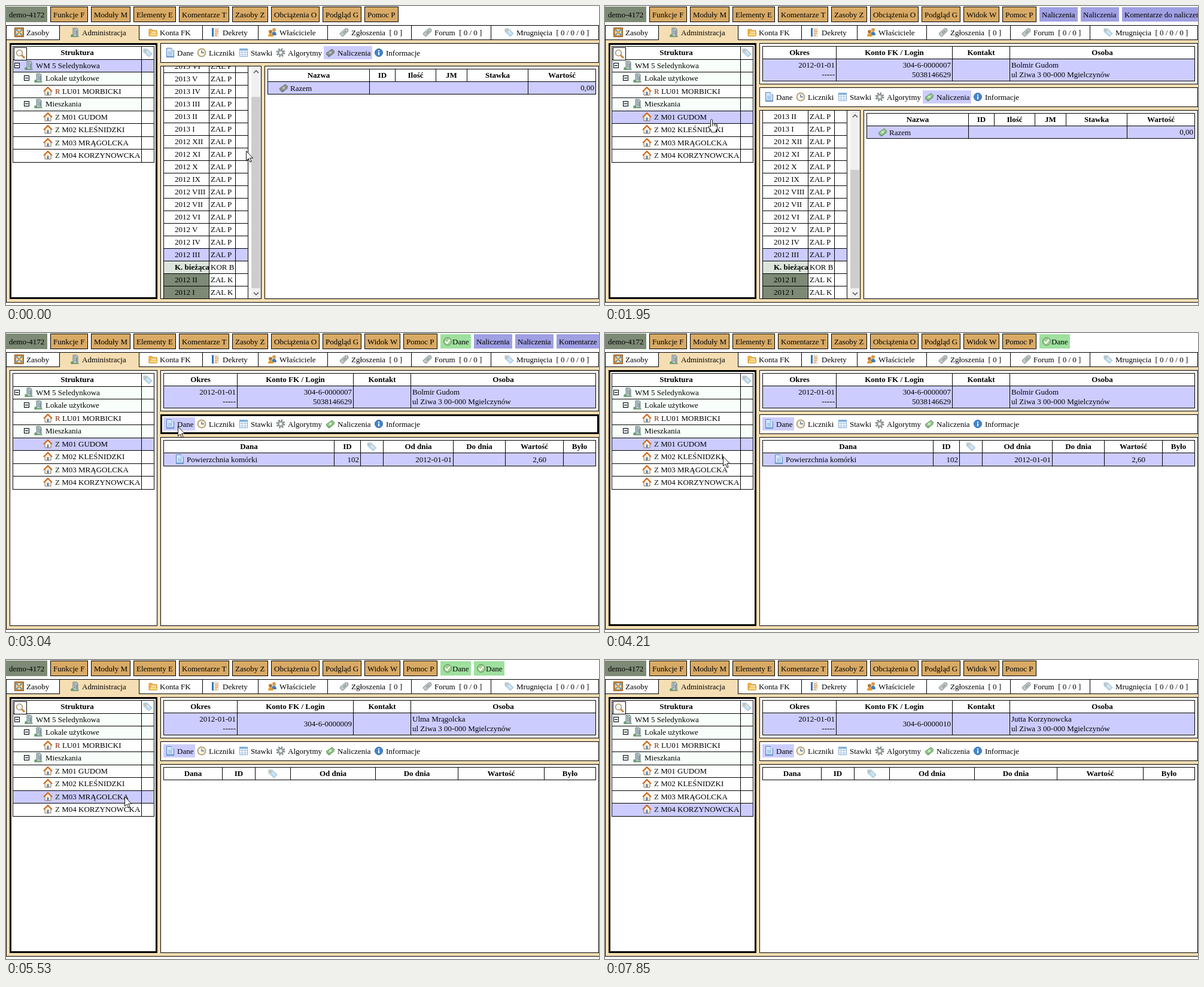
Animation of 991x500 px, one loop 8 s. Source, as an HTML page:

```html
<!DOCTYPE html>
<html lang="pl">
<head>
<meta charset="utf-8">
<title>Panel administracji</title>
<style>
html, body { margin: 0; width: 100%; height: 100%; overflow: hidden; background: #fff; }
svg { display: block; width: 991px; height: 500px; font: 13px "Liberation Serif", "Times New Roman", serif; }
text { white-space: pre; }
</style>
</head>
<body>
<svg viewBox="0 0 991 500">
<defs>
  <g id="house"><path d="M3 8v7h10V8L8 3z" fill="#fff3df" stroke="#8a7358"/><path d="M1 9 8 2l7 7" fill="none" stroke="#d2691e" stroke-width="2.2"/><path d="M6.500 15V9.500h3V15" fill="#5d82ad"/></g>
  <g id="building"><path d="M5 1h6l2 2v12H5z" fill="#b9c6c8" stroke="#6c7c80"/><path d="M7 4h2M7 7h2M7 10h2M11 5v8" stroke="#47697c"/><path d="M1 15h14M2 12h3v3H2z" stroke="#57915f" fill="#7ab46d"/></g>
  <g id="picture"><path d="M.5.500h15v15H.500z" fill="#c98c3f" stroke="#885622"/><path d="M3 3h10v10H3z" fill="#d6e4cf"/><path d="m3 3 10 10M13 3 3 13" stroke="#6a8db0" stroke-width="2"/><path d="M6 6h4v4H6z" fill="#e2a03a"/></g>
  <g id="folder"><path d="M1 3h5l1 2h7v9H1z" fill="#f2b846" stroke="#cc8e2d"/><path d="M5 7h8v4H5z" fill="#fff"/><path d="m1 14 2-5h12l-1 5z" fill="#ffdc83" stroke="#d79d35"/></g>
  <g id="book"><path d="M3 1h10v14H3z" fill="#f4f4ee" stroke="#d8d8d0"/><path d="M2 1h3v14H2z" fill="#3575b8"/><path d="M7 4h5M7 7h6M7 10h5M7 13h4" stroke="#e79548" stroke-width="1.500"/></g>
  <g id="people"><circle cx="11" cy="4" r="3" fill="#d89c50"/><path d="M7 13q0-6 4-6t4 6z" fill="#3f7fbe"/><circle cx="5" cy="7" r="3" fill="#b87832"/><path d="M1 15q0-5 4-5t5 5z" fill="#e49a2e"/></g>
  <g id="ticket"><path d="m2 9 8-7h4l1 4-8 8-2 1-4-4z" fill="#c3c9ca" stroke="#7c878a"/><path d="m6 9 5-4M7 11l5-5" stroke="#758084"/></g>
  <g id="tag"><path d="M1 2h6l8 8-5 5-9-8z" fill="#bddcf1" stroke="#9abbd1"/><circle cx="4" cy="5" r="1.300" fill="#fff" stroke="#d69a5d"/><path d="m7 6 4 5" stroke="#fff"/></g>
  <g id="doc"><path d="M2.500.500h8l4 4v11h-12z" fill="#d2e6fa" stroke="#4f83bf"/><path d="M10.500.500v4h4M5 7h7M5 9h7M5 11h7" fill="#fff" stroke="#8db2dc"/><path d="M2 14h13" stroke="#4f83bf"/></g>
  <g id="clock"><circle cx="8" cy="8" r="6.500" fill="#f6f5e6" stroke="#b8a37b" stroke-width="2"/><path d="M8 4v4h4" fill="none" stroke="#4c6e95" stroke-width="1.300"/></g>
  <g id="sheet"><path d="M1.500 1.500h13v13h-13z" fill="#f5faff" stroke="#83acd5"/><path d="M1 3h14" stroke="#80afe0" stroke-width="3"/><path d="M2 7.500h12M2 11.500h12M5.500 4v10M10.500 4v10" stroke="#a9c4df"/></g>
  <g id="gear"><circle cx="8" cy="8" r="6" fill="none" stroke="#858c8e" stroke-width="3" stroke-dasharray="2.500 2.212"/><circle cx="8" cy="8" r="4" fill="#cfd6d7" stroke="#8b9597" stroke-width="2"/><circle cx="8" cy="8" r="1.500" fill="#fff"/></g>
  <g id="money"><path d="m1 9 10-7 4 4-9 8z" fill="#9acb8d" stroke="#4d8c4c"/><path d="m1 11 5 4 9-7" fill="none" stroke="#568c52"/><circle cx="8" cy="8" r="2" fill="#d6edcd"/></g>
  <g id="grayMoney"><path d="m1 9 10-7 4 4-9 8z" fill="#8f968e" stroke="#626a63"/><path d="m1 11 5 4 9-7" fill="none" stroke="#626a63"/><circle cx="8" cy="8" r="2" fill="#bec5bd"/></g>
  <g id="info"><circle cx="8" cy="8" r="6.500" fill="#4385cc" stroke="#376ca6"/><path d="M8 4v2M8 7v5" stroke="#fff" stroke-width="2"/></g>
  <g id="check"><circle cx="8" cy="8" r="6.500" fill="#9ecf91" stroke="#62835e"/><path d="m4 8 3 3 5-6" fill="none" stroke="#fff" stroke-width="2.200"/></g>
  <g id="search"><path d="m10 10 5 5" stroke="#c48736" stroke-width="3"/><circle cx="6.500" cy="6.500" r="5" fill="#edf6fb" stroke="#b59969" stroke-width="1.500"/></g>
  <g id="arrow"><path d="M.5.500v16l3.700-3.400 2.600 6 2.400-1-2.600-5.800h4.900z" fill="#fff" stroke="#111"/></g>
  <g id="hand"><path d="M-1.500 13V1.500q1.500-2.500 3 0V8l2-.8 1 1.300 2-.6 1 1.500 2-.2V16l-2 3v3h-8v-3l-4-5q-1-2.500 1-2.500z" fill="#fff" stroke="#222"/><path d="M1.500 8v4M4.500 9v3M7.500 10v3" stroke="#222"/></g>
</defs>
<g id="page"></g>
<g id="pointer"></g>
</svg>
<script>
const LOOP = 8000, SELECTED = '#ccccff', MOSS = '#7d8a75', WHEAT = '#f5deb3';
const page = document.getElementById('page'), pointer = document.getElementById('pointer');

const rect = (x, y, w, h, fill = '#000') => `<rect x="${x}" y="${y}" width="${w}" height="${h}" fill="${fill}"/>`;
const box = (x, y, w, h, fill = '#fff', b = 1) => rect(x, y, w, h) + rect(x + b, y + b, w - 2 * b, h - 2 * b, fill);
const icon = (id, x, y) => `<use href="#${id}" x="${x}" y="${y}"/>`;
const text = (s, x, y, extra = '') => `<text x="${x}" y="${y}" ${extra}>${s}</text>`;
const right = (s, x, y) => text(s, x, y, 'text-anchor="end"');
const title = (s, x, y) => text(s, x, y, 'text-anchor="middle" font-weight="bold"');
const vlines = (xs, y, h) => xs.map(x => rect(x, y, 1, h)).join('');
const hlines = (ys, x, w) => ys.map(y => rect(x, y, w, 1)).join('');
const within = (t, spans) => spans.some(([a, b]) => t >= a && t < b);

function table(xs, ys, labels, selected = true) {
  const x = xs[0], w = xs.at(-1) - x + 1, y = ys[0], h = ys.at(-1) - y + 1;
  return rect(x, y, w, h, '#fff')
    + (selected && ys[2] ? rect(x, ys[1], w, ys[2] - ys[1], SELECTED) : '')
    + vlines(xs, y, h) + hlines(ys, x, w)
    + labels.map((s, i) => {
      const mid = (xs[i] + xs[i + 1] + 1) / 2;
      return s === 'tag' ? icon(s, mid - 8, y + 3) : title(s, mid, y + 15);
    }).join('');
}

const people = [
  ['Bolmir Gudom', '304-6-0000007', '5038146629'],
  ['Odar Kleśnidzki', '304-6-0000008'],
  ['Ulma Mrągolcka', '304-6-0000009'],
  ['Jutta Korzynowcka', '304-6-0000010']
];

function menu(hasPerson) {
  const items = [['Funkcje F', 74, 63], ['Moduły M', 142, 66], ['Elementy E', 213, 71], ['Komentarze T', 289, 84],
    ['Zasoby Z', 378, 60], ['Obciążenia O', 443, 81], ['Podgląd G', 529, 65],
    ...(hasPerson ? [['Widok W', 599, 60], ['Pomoc P', 664, 57]] : [['Pomoc P', 599, 57]])];
  return rect(0, 1, 69, 26, MOSS) + text('demo-4172', 5, 19)
    + items.map(([s, x, w]) => box(x, 1, w, 26, '#d8aa65') + text(s, x + 5, 19)).join('');
}

function notices(t) {
  const info = [['Naliczenia', 64], ['Naliczenia', 64], ['Komentarze do naliczeń', 132]];
  const busy = ['Dane', 35], done = ['Dane', 51, true];
  const phases = [[0, []], [1700, info], [2800, [busy, ...info]], [3040, [done, ...info]], [3515, [done]],
    [4440, [busy, done]], [4520, [done]], [5530, [done, done]], [5990, [done]], [6140, [busy, done]],
    [6390, [done, done]], [7000, [done]], [7850, []]];
  let x = 726;
  return phases.findLast(p => t >= p[0])[1].map(([s, w, ok]) => {
    const out = rect(x, 2, w, 24, ok ? '#9ee09e' : '#9f9fe3') + (ok ? icon('check', x + 4, 6) : '') + text(s, x + (ok ? 20 : 4), 19);
    x += w + 5;
    return out;
  }).join('');
}

function tabs() {
  const edges = [0, 89, 222, 328, 421, 537, 677, 810, 990];
  const items = [['picture', 'Zasoby', 14], ['building', 'Administracja', 107], ['folder', 'Konta FK', 238],
    ['book', 'Dekrety', 342], ['people', 'Właściciele', 437], ['ticket', 'Zgłoszenia  [ 0 ]', 557],
    ['ticket', 'Forum  [ 0 / 0 ]', 696], ['tag', 'Mrugnięcia  [ 0 / 0 / 0 ]', 833]];
  return rect(0, 32, 991, 464) + rect(1, 57, 990, 438, WHEAT) + rect(1, 33, 989, 23, '#fff')
    + vlines(edges, 32, 25) + rect(90, 33, 132, 24, WHEAT)
    + items.map(([id, s, x]) => icon(id, x, 36) + text(s, x + (id === 'folder' ? 19 : 20), 49)).join('');
}

function tree(selected, focused, search) {
  const rows = [[0, 'WM 5 Seledynkowa'], [1, 'Lokale użytkowe'], [2, 'LU01 MORBICKI', 'R'], [1, 'Mieszkania'],
    [2, 'M01 GUDOM', 'Z'], [2, 'M02 KLEŚNIDZKI', 'Z'], [2, 'M03 MRĄGOLCKA', 'Z'], [2, 'M04 KORZYNOWCKA', 'Z']];
  const top = i => Math.floor(89 + 21.5 * i);
  let out = box(6, 62, 247, 428, '#fff', focused ? 3 : 1) + rect(11, 67, 237, 195, '#fff')
    + title('Struktura', 119, 82) + icon('tag', 229, 70);
  rows.forEach(([level, label, mark], i) => {
    const y = top(i), x = 50 + 16 * level;
    out += rect(11, y, 237, 22, i === selected ? SELECTED : level < 2 ? '#f8fffa' : '#fff');
    if (level < 2) {
      out += box(x - 36, y + 6, 9, 9, '#e4edf6') + rect(x - 34, y + 10, 5, 1) + icon('building', x - 20, y + 2);
    } else {
      out += icon('house', 62, y + 2);
    }
    const prefix = mark ? `<tspan fill="${mark === 'R' ? '#7b2d10' : '#102810'}">${mark}</tspan> ` : '';
    out += text(prefix + label, x, y + 15);
  });
  out += hlines([67, ...rows.map((_, i) => top(i)), 261], 11, 237) + vlines([11, 226, 247], 67, 195);
  if (search) out += box(13, 69, 22, 22) + icon('search', 16, 72);
  return out;
}

function personPanel([name, account, login]) {
  return box(258, 62, 733, 69)
    + table([263, 386, 580, 676, 985], [67, 88, 125], ['Okres', 'Konto FK / Login', 'Kontakt', 'Osoba'])
    + right('2012-01-01', 384, 103) + right('-----', 384, 119)
    + right(account, 578, login ? 103 : 111) + (login ? right(login, 578, 119) : '')
    + text(name, 679, 103) + text('ul Ziwa 3 00-000 Mgielczynów', 679, 119);
}

function toolbar(y, dataActive, focused, money) {
  const items = [['doc', 'Dane', 266], ['clock', 'Liczniki', 319], ['sheet', 'Stawki', 389], ['gear', 'Algorytmy', 451],
    [money, 'Naliczenia', 534], ['info', 'Informacje', 615]];
  return box(258, y, 733, 33, '#fff', focused ? 3 : 1)
    + (dataActive ? rect(263, y + 5, 53, 22, SELECTED) : rect(531, y + 5, 81, 22, SELECTED))
    + items.map(([id, s, x]) => icon(id, x, y + 8) + text(s, x + 20, y + 21)).join('');
}

function periods(top) {
  const roman = 'I II III IV V VI VII VIII IX X XI XII'.split(' ');
  const labels = ['2012 I', '2012 II', 'K. bieżąca', ...roman.slice(2).map(r => '2012 ' + r), ...roman.slice(0, 6).map(r => '2013 ' + r)];
  const thumb = top === 100 ? 152 : 274;
  let rows = '';
  labels.forEach((s, i) => {
    const y = 468 - 21 * i;
    const fill = i < 2 ? MOSS : i === 2 ? '#dce4dc' : i === 3 ? SELECTED : '#fff';
    rows += rect(263, y, 142, 21, i === 3 ? SELECTED : '#fff') + rect(263, y, 76, 21, fill) + rect(263, y, 142, 1)
      + text(s, 282, y + 15, i === 2 ? 'font-weight="bold"' : '')
      + text(i < 2 ? 'ZAL K' : i === 2 ? 'KOR B' : 'ZAL P', 342, y + 15);
  });
  return box(258, top, 169, 390)
    .replaceAll('height="390"', `height="${490 - top}"`).replaceAll('height="388"', `height="${488 - top}"`)
    + `<clipPath id="list"><path d="M259 ${top + 1}H426V489H259z"/></clipPath><g clip-path="url(#list)">`
    + rows + vlines([263, 339, 383, 404], top, 400) + rect(410, top, 16, 400, '#f0f0f0') + rect(410, thumb, 15, 320 - thumb + 152, '#cdcdcd')
    + `<path d="m414 ${top + 12} 4-4 4 4M414 479l4 4 4-4" fill="none" stroke="#505050" stroke-width="1.500"/></g>`;
}

function charges(top, money) {
  const y = top + 5;
  return box(432, top, 559, 490 - top)
    + table([437, 607, 650, 718, 770, 872, 985], [y, y + 21, y + 42], ['Nazwa', 'ID', 'Ilość', 'JM', 'Stawka', 'Wartość'])
    + rect(608, y + 22, 264, 20, SELECTED)
    + icon(money, 456, y + 24) + text('Razem', 475, y + 37) + right('0,00', 983, y + 36);
}

function dataPanel(value) {
  const xs = value ? [263, 548, 592, 630, 747, 834, 931, 985] : [263, 361, 416, 475, 617, 755, 899, 985];
  return box(258, 174, 733, 316)
    + table(xs, value ? [179, 200, 222] : [179, 200], ['Dana', 'ID', 'tag', 'Od dnia', 'Do dnia', 'Wartość', 'Było'])
    + (value ? icon('doc', 282, 203) + text('Powierzchnia komórki', 302, 216) + right('102', 590, 216)
      + right('2012-01-01', 745, 216) + right(value, 903, 216) : '');
}

function drawPage(t) {
  const person = [1700, 4440, 5300, 6140].findLastIndex(start => t >= start);
  const hasPerson = person >= 0, dataActive = t >= 2800;
  const barFocused = within(t, [[2740, 4140]]);
  const money = hasPerson ? 'money' : 'grayMoney';
  const top = hasPerson ? 174 : 100;
  const value = within(t, [[3040, 4440]]) ? '2,60' : within(t, [[4440, 5530]]) ? '4,60' : '';
  return rect(0, 0, 991, 500, '#fff') + menu(hasPerson) + notices(t) + tabs()
    + tree(hasPerson ? 4 + person : 0, !barFocused, !within(t, [[2740, 5150]]))
    + (hasPerson ? personPanel(people[person]) : '')
    + toolbar(hasPerson ? 136 : 62, dataActive, barFocused, money)
    + (dataActive ? dataPanel(value) : periods(top) + charges(top, money));
}

// Each move: first step, last step, step count, end point.
const moves = [[680, 680, 1, 400, 242], [910, 1550, 9, 172, 191], [1950, 2410, 7, 284, 161], [2510, 2740, 4, 287, 156],
  [3440, 3970, 8, 197, 195], [4140, 4140, 1, 197, 206], [4440, 4920, 7, 197, 217], [5150, 5150, 1, 197, 220],
  [5300, 5300, 1, 198, 228], [5610, 5840, 4, 199, 253], [7380, 7630, 4, 371, 467]];

function drawPointer(t) {
  if (t >= 7700) return '';
  let x = 401, y = 242;
  for (const [start, end, count, toX, toY] of moves) {
    if (t < start) break;
    const gap = count > 1 ? (end - start) / (count - 1) : 1;
    const part = Math.min(count, Math.floor((t - start) / gap + 1.001)) / count;
    const eased = part * part * (3 - 2 * part);
    x += Math.round((toX - x) * eased);
    y += Math.round((toY - y) * eased);
  }
  const hand = within(t, [[1310, 2030], [2330, 2800], [4290, 4440], [5690, 6140]]);
  const click = within(t, [[1550, 1700], [2660, 2740], [4290, 4440], [5990, 6140]]);
  return (click ? `<circle cx="${x}" cy="${y + 1}" r="13" fill="#f5e52b" opacity=".75"/>` : '')
    + icon(hand ? 'hand' : 'arrow', x, y);
}

const shown = new Map();
function show(node, markup) {
  if (shown.get(node) === markup) return;
  shown.set(node, markup);
  node.innerHTML = markup;
}

const begin = performance.now();
function tick(now) {
  const t = Math.max(0, now - begin) % LOOP;
  show(page, drawPage(t));
  show(pointer, drawPointer(t));
  requestAnimationFrame(tick);
}
tick(begin);
</script>
</body>
</html>
```
